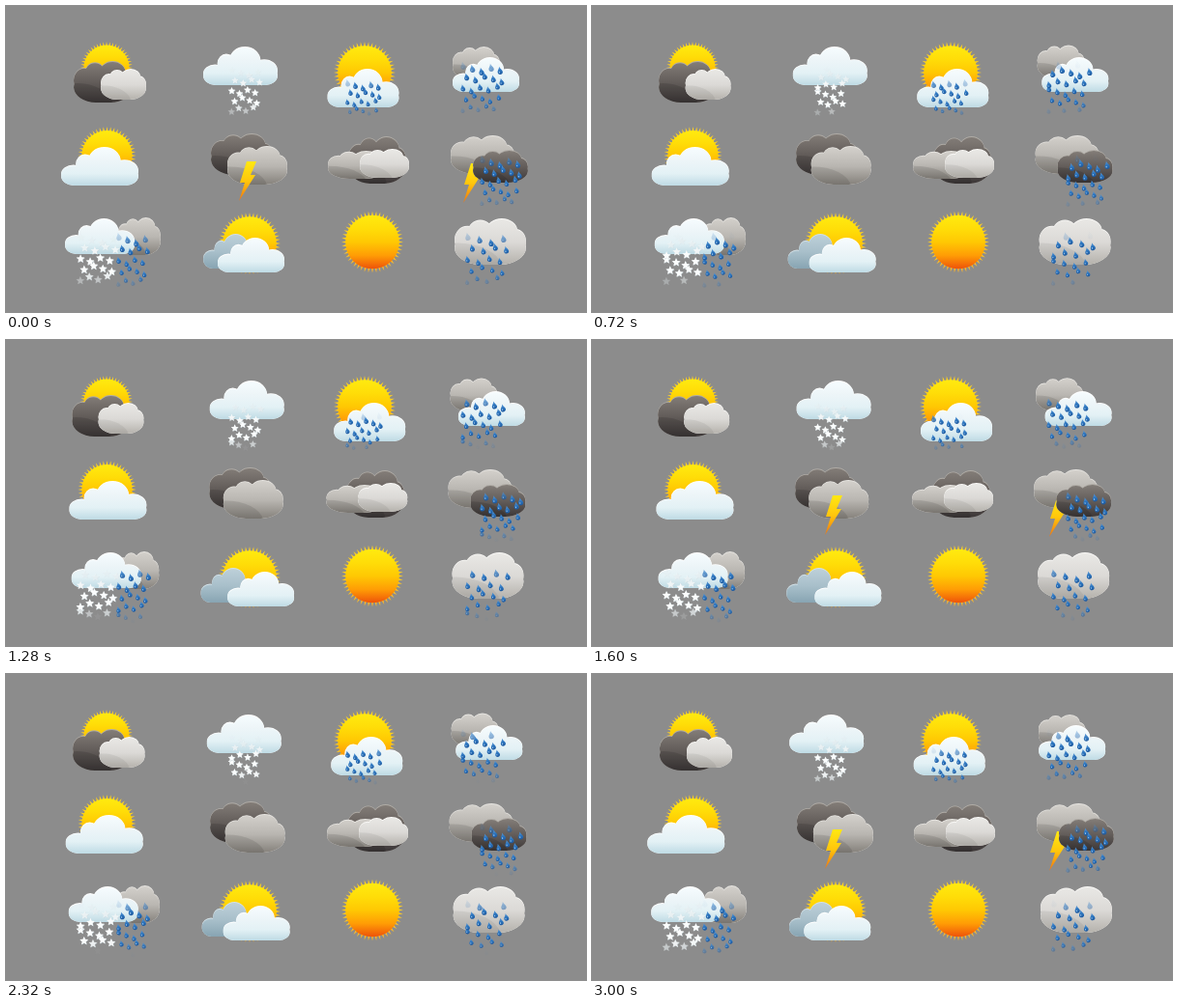
Animation, 600 px wide and 317 px high, one loop 3040 ms. Source, as an HTML page with a canvas:

```html
<!DOCTYPE html>
<html>
<head>
<meta charset="utf-8">
<title>Weather icons</title>
<style>
html, body { margin: 0; width: 100%; height: 100%; overflow: hidden; background: #8c8c8c; }
canvas { display: block; }
</style>
</head>
<body>
<canvas id="stage" width="600" height="317"></canvas>
<script>
const c = document.getElementById('stage').getContext('2d');
const LOOP = 3040, HALF = LOOP / 2;
let sway = 0, fall = 0;

// Lobes and rounded base as fractions of the cloud box
const SMOOTH = {
  lobes: [[.16, .7, .16, .24], [.31, .44, .12, .25], [.56, .36, .21, .36], [.82, .62, .18, .29]],
  base: { top: .5, rx: .17, ry: .26 }
};
const PUFFY = {
  lobes: [[.18, .46, .18, .3], [.36, .28, .17, .25], [.66, .27, .22, .27], [.86, .5, .14, .27]],
  base: { top: .25, rx: .42, ry: .42 }
};

const WHITE = { form: SMOOTH, rim: '#ffffff', stops: ['#f6fcfe', '#edf5f8', '#e3f1f5', '#bcd9e3'] };
const BLUE = { form: SMOOTH, rim: '#d3e1e7', stops: ['#bdd0d9', '#a8bfca', '#86a3b1'] };
const LIGHT = { form: PUFFY, rim: '#faf9f7', stops: ['#e9e8e5', '#dbd9d6', '#b3b0aa'], shade: .06 };
const GRAY = { form: PUFFY, rim: '#e6e4e0', stops: ['#d3d0cb', '#b9b6b1', '#837f79'], shade: .1 };
const DARK = { form: PUFFY, rim: '#b0aca6', stops: ['#837d78', '#625c59', '#3b3636'], shade: .12 };

function gradient(x0, y0, x1, y1, stops) {
  const g = c.createLinearGradient(x0, y0, x1, y1);
  stops.forEach((s, i) => g.addColorStop(i / (stops.length - 1), s));
  return g;
}

function cloud({ form, rim, stops, shade }, x, y, w, h, dx, dy = 0) {
  x += dx * sway;
  y += dy * sway;
  const { top, rx, ry } = form.base;
  const shape = new Path2D();
  shape.roundRect(x, y + top * h, w, (1 - top) * h, { x: rx * w, y: ry * h });
  for (const [cx, cy, rx, ry] of form.lobes) {
    const px = x + cx * w, py = y + cy * h;
    shape.moveTo(px + rx * w, py);
    shape.ellipse(px, py, rx * w, ry * h, 0, 0, 2 * Math.PI);
  }
  c.save();
  c.fillStyle = rim;
  c.fill(shape);
  c.clip(shape);
  c.translate(0, .9);
  c.fillStyle = gradient(x + w / 2, y, x + w / 2, y + h, stops);
  c.fill(shape);
  if (shade) {
    c.fillStyle = `rgba(0,0,0,${shade})`;
    c.beginPath();
    c.ellipse(x + w * .12, y + h, w * .55, h * .48, .1, 0, 7);
    c.fill();
  }
  c.restore();
}

function star(x, y, outer, inner, n) {
  c.beginPath();
  for (let i = 0; i < 2 * n; i++) {
    const a = i * Math.PI / n - Math.PI / 2, r = i % 2 ? inner : outer;
    c.lineTo(x + r * Math.cos(a), y + r * Math.sin(a));
  }
  c.fill();
}

function sun(x, y, r) {
  c.fillStyle = gradient(x, y - r, x, y + r, ['#ffd21e', '#ffcf20', '#fbb52a']);
  star(x, y, r, r * .77, 48);
  c.fillStyle = gradient(x, y - r * .87, x, y + r * .87, ['#ffea10', '#ffdd08', '#ffc803', '#ff9d05', '#ee520a']);
  c.beginPath();
  c.arc(x, y, r * .87, 0, 7);
  c.fill();
}

function bolt(x, y) {
  const on = fall < .38 || fall > .88;
  if (!on) return;
  c.fillStyle = gradient(x, y, x, y + 41, ['#ffe812', '#ffc60c', '#ee7410']);
  c.beginPath();
  for (const [dx, dy] of [[10, 0], [20, 0], [14, 14], [19, 14], [2, 41], [8, 22], [3, 22]]) c.lineTo(x + dx, y + dy);
  c.fill();
}

// Staggered rows that fall through a box, drift left and wrap round
function shower(x, y, w, h, cols, rows, fadeIn, draw) {
  for (let r = 0; r < rows; r++) {
    for (let i = 0; i < cols; i++) {
      const jag = (i * .43 + r * .21) % 1 - .5;
      const q = ((r + .5 + jag * .7) / rows + fall) % 1;
      const px = x + (i + .3 + (r % 2) * .4) * w / cols * (1 - .2 * q);
      c.globalAlpha = Math.min(1, q * fadeIn, (1 - q) * 5);
      draw(px, y + q * h, q);
    }
  }
  c.globalAlpha = 1;
}

function rain(x, y, w, h, cols = 5, rows = 5, size = 1.1) {
  shower(x, y, w, h, cols, rows, 9, (px, py, q) => {
    c.save();
    c.translate(px, py);
    c.rotate(-.2);
    c.scale(size - .3 * q, size - .3 * q);
    c.fillStyle = gradient(0, -4.5, 0, 3.5, ['#5b9ad8', '#2c74bd', '#1c569b']);
    c.beginPath();
    c.moveTo(0, -4.5);
    c.bezierCurveTo(.4, -2.3, 2.6, -.8, 2.5, 1);
    c.bezierCurveTo(2.4, 4, -2.4, 4, -2.5, 1);
    c.bezierCurveTo(-2.6, -.8, -.4, -2.3, 0, -4.5);
    c.fill();
    c.fillStyle = '#9cc8ee';
    c.fillRect(-1.3, .2, 1, 1.4);
    c.restore();
  });
}

function snow(x, y, w, h, size) {
  shower(x, y, w, h, 4, 5, 2.5, (px, py) => {
    c.fillStyle = '#c9d5da';
    star(px + .4, py + .4, size, size * .45, 5);
    c.fillStyle = '#fbfdfd';
    star(px, py, size, size * .45, 5);
  });
}

function paint(t) {
  sway = 1 - Math.abs(1 - t / HALF);
  fall = t % HALF / HALF;
  c.fillStyle = '#8c8c8c';
  c.fillRect(0, 0, 600, 317);

  sun(104, 64, 27);
  cloud(DARK, 70, 57, 61, 43, -2);
  cloud(LIGHT, 98, 65, 47, 32, -3);

  cloud(WHITE, 204, 42, 77, 40, 8);
  snow(231, 65, 36, 47, 4);

  sun(371, 69, 32);
  cloud(WHITE, 332.5, 65, 74, 40, 8);
  rain(351, 79, 41, 34, 5, 4, 1);

  cloud(GRAY, 462, 42, 49, 34, -3, -3);
  cloud(WHITE, 462, 53, 69, 36, 7);
  rain(470, 61, 49, 50);

  sun(104.5, 155, 30);
  cloud(WHITE, 57, 146, 80, 40, 10);

  cloud(DARK, 212, 132, 64, 43, -2);
  cloud(GRAY, 229, 145, 62, 40, -5);
  bolt(239, 161);

  cloud(DARK, 354, 135, 60, 49, -2);
  cloud(GRAY, 333, 150, 60, 29, -2);
  cloud(LIGHT, 366, 148, 51, 30, -2);

  cloud(GRAY, 460, 134, 66, 40, -3);
  bolt(471, 163);
  cloud(DARK, 483, 149, 57, 34, -3);
  rain(490, 158, 47, 49);

  cloud(GRAY, 115, 219, 45, 39, -2);
  cloud(WHITE, 61, 220, 72, 37, 8);
  snow(74, 238, 45, 49, 4.6);
  rain(114, 238, 37, 53, 4);

  sun(252, 246, 32);
  cloud(BLUE, 204, 236, 60, 36, -3);
  cloud(WHITE, 219, 240, 69, 36, 12);

  sun(379, 244.5, 32);

  cloud(LIGHT, 464, 220, 74, 48, -3);
  rain(474, 238, 50, 51, 4);
}

const start = performance.now();
function tick() {
  const t = (performance.now() - start) % LOOP;
  paint(Math.floor(t / 40) * 40);
  requestAnimationFrame(tick);
}
tick();
</script>
</body>
</html>
```
